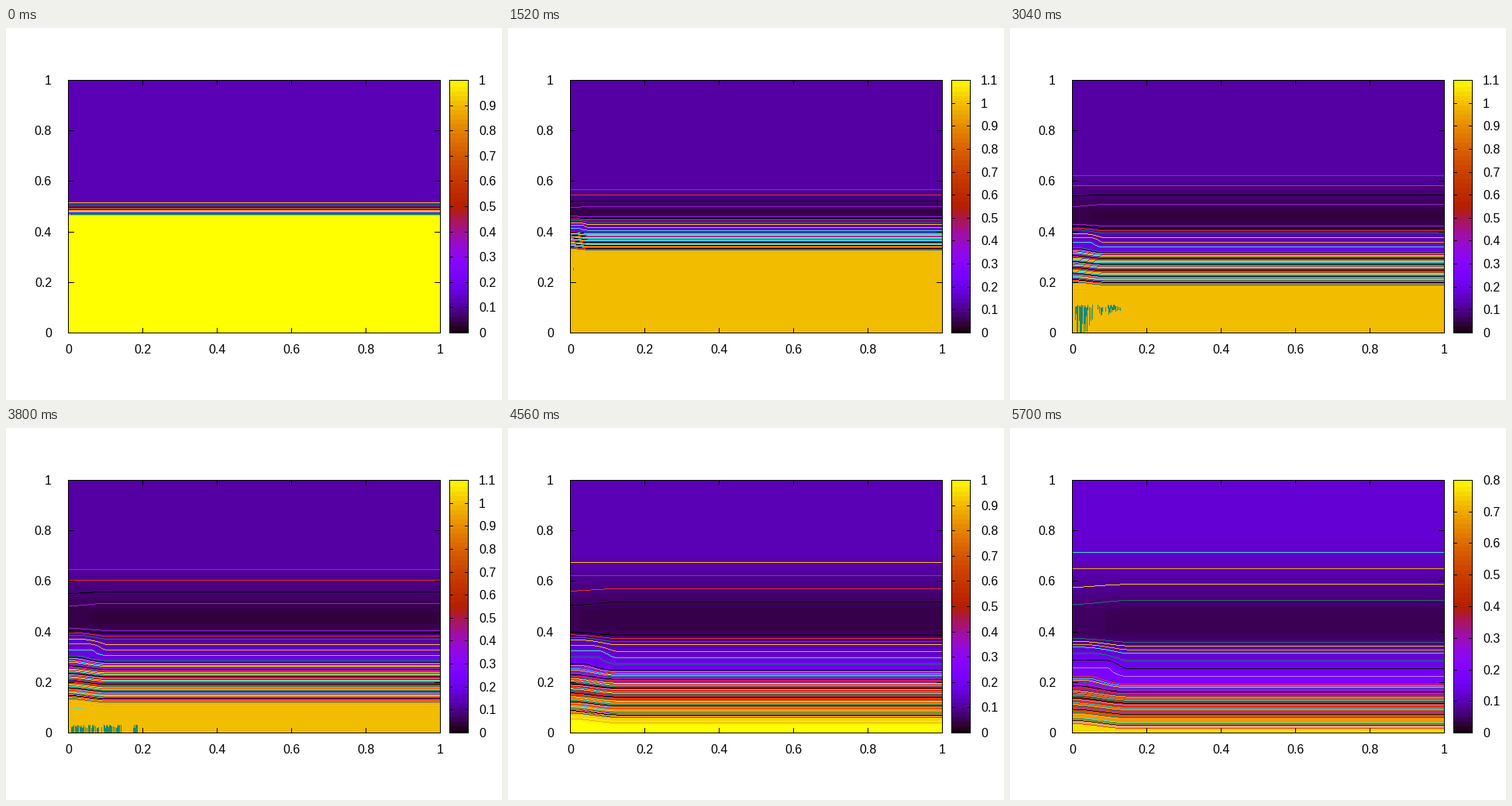
Recreate the animation shown at these times as a matplotlib script. Size 640x480 px, loop 5.89 s.

```python
import numpy as np
import matplotlib.pyplot as plt
from matplotlib.animation import FuncAnimation
from matplotlib.colors import to_rgb

FRAMES, STEP_MS = 31, 190
W, H, DPI = 640, 480, 100
L, R, T, B = 80, 560, 67, 393      # border pixels of the map
BAR_L, BAR_R = 572, 596
FIRST, STEP = .06, .02             # contour levels

# density, position at the start, speed per step
KEYS = [(1.0, .463, -.0182), (.95, .466, -.0170), (.20, .467, -.0092),
        (.12, .484, -.0057), (.06, .496, -.0046),
        (.06, .490, .0011), (.12, .5125, .0067), (.125, .5225, .0092)]
CYCLE = np.array([to_rgb(c) for c in (
    "#9c1fd6", "#000000", "#e8301c", "#2a6a70", "#ffc020", "#f0a818",
    "#40e0d0", "#008860", "#000000", "#c080ff", "#e8301c", "#20d8e8",
    "#ffc020", "#306080")])
TEAL, TURQUOISE = to_rgb("#20886c"), to_rgb("#40e0d0")

plt.rcParams["font.family"] = "Liberation Sans"
fig = plt.figure(figsize=(W / DPI, H / DPI), dpi=DPI, facecolor="white")
ax = fig.add_axes([0, 0, 1, 1])
ax.axis("off")

U, V = np.meshgrid((np.arange(L + 1, R) - L) / (R - L),
                   (B - np.arange(T + 1, B)) / (B - T))


def row(v):
    return int(round(B - (B - T) * v))


def palette(x, n):
    x = np.round(np.clip(x, 0, 1) * (n - 1)) / (n - 1)
    blue = np.clip(np.sin(2 * np.pi * x), 0, 1)
    return np.stack([np.sqrt(x), x ** 3, blue], axis=-1)


def peak(i):
    """Highest density; it falls once the wave has reached the floor."""
    return 1 - .04 * max(0, i - 24)


def scale_top(i):
    return 1.1 if 7 <= i <= 21 else np.ceil(peak(i) * 10 - 1e-6) / 10


def bump(x, mid, width):
    return np.exp(-((x - mid) / width) ** 2)


def density(i):
    # disturbance spreading from the left edge
    t = max(i, .1) / 30
    eta = (V - .48) / t
    amp = t * (.01 * (1 - np.tanh((eta + .1) / .05))
               + .016 * bump(eta, -.21, .08) - .017 * bump(eta, .05, .07))
    start = .6 * bump(eta, -.21, .06)
    w = np.clip((U / (.012 + .0047 * i) - start) / (1 - start), 0, 1)
    near = 1 - w * w * (3 - 2 * w)
    y = V - amp * near

    rho, pos, speed = np.array(KEYS).T
    knots = np.maximum.accumulate(pos + speed * i)
    low, high = knots[4:6]
    depth = .4 * np.clip(np.minimum(y - low, high - y), 0, None)
    trough = np.minimum(depth, .016 - .008 * near)
    return np.minimum(np.interp(y, knots, rho) - trough, peak(i))


def draw_contours(area, rho, shift):
    last = int(round((.98 - FIRST) / STEP))
    band = np.floor((rho - FIRST) / STEP + 1e-6).astype(int).clip(-1, last)
    edge = band[:-1] != band[1:]
    level = np.maximum(band[:-1], band[1:])[edge]
    area[:-1][edge] = CYCLE[(level + shift) % len(CYCLE)]


def draw_drips(img, i):
    rng = np.random.default_rng(11)
    head = .425 - .0197 * i
    for x in range(84, 170):
        rate, jitter, keep = rng.uniform(.8, 8), rng.integers(0, 5), rng.random()
        born = 8 + 1.05 * np.sqrt(x - 84)
        gap = 148 < x < 164 or (106 < x < 113 and i < 18)
        if i >= born and keep < .65 and not gap:
            y = row(head) + jitter
            img[y:min(y + 4 + int((i - born) * rate), B), x] = TEAL


def frame(img, x0, x1):
    img[[T, B], x0:x1 + 1] = 0
    img[T:B + 1, [x0, x1]] = 0


def side_ticks(img, y, x0, x1, size):
    img[y, x0:x0 + size] = 0
    img[y, x1 - size + 1:x1 + 1] = 0


def label(x, y, v, ha):
    return ax.text(x, y + 6, f"{v:.1f}".removesuffix(".0"), ha=ha,
                   va="baseline", fontsize=16 * 72 / DPI)


def picture(i):
    img = np.ones((H, W, 3))
    top = scale_top(i)
    rho = density(i)
    area = img[T + 1:B, L + 1:R]
    area[:] = palette(rho / top, 128)
    draw_contours(area, rho, int(round((1.1 - top) * 10)))
    if 7 <= i <= 21:
        x = L + 1 + int(max(0, i - 12) * .8)
        img[row(.47 - .0186 * i), x:x + 10 + i // 5] = TURQUOISE
        if i > 7:
            draw_drips(img, i)

    img[T + 1:B, BAR_L + 1:BAR_R] = palette(V[:, :1], 56)
    frame(img, L, R)
    frame(img, BAR_L, BAR_R)
    for v in np.arange(.2, .9, .2):
        x = int(round(L + (R - L) * v))
        side_ticks(img, row(v), L, R, 8)
        img[T:T + 7, x] = img[B - 6:B + 1, x] = 0
    n = int(round(top * 10))
    for k in range(n + 1):
        side_ticks(img, row(k / n), BAR_L, BAR_R, 5)
    return img


bar_labels = []


def draw(i):
    screen.set_data(picture(i))
    while bar_labels:
        bar_labels.pop().remove()
    n = int(round(scale_top(i) * 10))
    for k in range(n + 1):
        bar_labels.append(label(610, row(k / n), k / 10, "left"))
    return [screen]


screen = ax.imshow(picture(0), extent=(0, W, H, 0), aspect="auto",
                   interpolation="nearest")
for v in np.arange(0, 1.1, .2):
    label(L + (R - L) * v + .5, 414, v, "center")
    label(59, row(v), v, "right")

anim = FuncAnimation(fig, draw, frames=FRAMES, interval=STEP_MS,
                     init_func=lambda: draw(0), repeat=True, repeat_delay=0,
                     blit=False)
plt.show()
```
